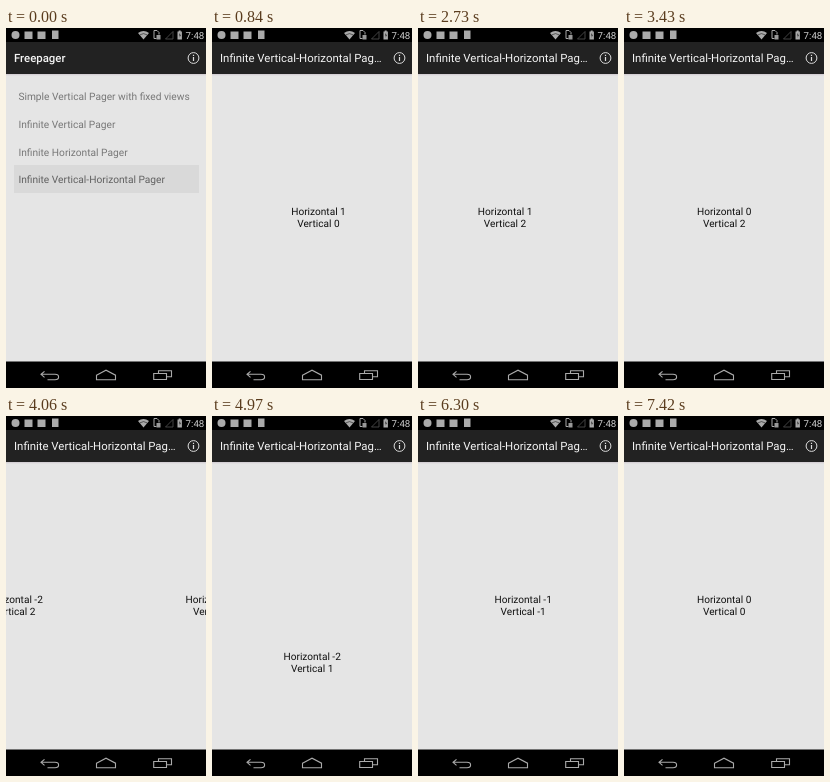
An HTML page that plays this animation: 200x360 px, repeating every 7.49 s.

```html
<!DOCTYPE html>
<html lang="en">
<head>
<meta charset="utf-8">
<title>Infinite pager</title>
<style>
html, body { margin: 0; width: 100%; height: 100%; overflow: hidden; background: #000; }
svg { display: block; width: 100%; height: 100%; }
text { font-family: Roboto, "Noto Sans", sans-serif; text-rendering: geometricPrecision; }
.title { font-size: 11.4px; fill: #f4f4f4; }
.row { font-size: 10.2px; fill: #777; }
.page { font-size: 10.1px; fill: #111; text-anchor: middle; }
.line { fill: none; stroke: #aaa; }
</style>
</head>
<body>
<svg viewBox="0 0 200 360">
  <defs>
    <clipPath id="content"><rect y="45" width="200" height="289"/></clipPath>
    <linearGradient id="shade" x2="0" y2="1">
      <stop stop-color="#cfc8cf"/><stop offset="1" stop-color="#e5e5e5"/>
    </linearGradient>
  </defs>
  <rect width="200" height="360"/>
  <rect y="45" width="200" height="288.5" fill="#e5e5e5"/>
  <rect y="46" width="200" height="2" fill="url(#shade)"/>

  <g clip-path="url(#content)">
    <g id="list">
      <rect x="8" y="137" width="185" height="28" fill="#d9d9d9"/>
    </g>
    <g id="pages"></g>
  </g>

  <rect y="14" width="200" height="32" fill="#222"/>
  <text id="listTitle" class="title" x="8" y="34" font-weight="500">Freepager</text>
  <text id="pageTitle" class="title" x="8" y="34">Infinite Vertical-Horizontal Pag…</text>
  <circle class="line" cx="187.5" cy="30" r="5.4" style="stroke:#ddd"/>
  <path d="M187.5 26.7v1.3M187.5 29v4" stroke="#ddd" stroke-width="1.2"/>

  <!-- status bar -->
  <g fill="#aaa">
    <circle cx="9.5" cy="7" r="4"/>
    <rect x="18.5" y="3.5" width="8" height="7.5"/>
    <rect x="31.5" y="3.5" width="8" height="7.5"/>
    <rect x="46" y="2.5" width="6.5" height="8.5"/>
    <path d="M132 5Q137.5 .8 143 5L137.5 11.5Z"/>
    <path d="M171.5 3.5h1.2v-1h2v1h1.2v8h-4.4z"/>
  </g>
  <path d="M134 6.8q3.5-2.4 7 0" fill="none" stroke="#000" stroke-width=".5"/>
  <path class="line" d="M150.5 10.5h-2.5v-8h3l2 2v2"/>
  <rect x="150.5" y="7" width="4" height="4.5" fill="#999"/>
  <path class="line" d="M159.5 11h7.5v-7.5z" style="stroke:#555" stroke-width=".8"/>
  <path d="M174.2 4.5l-1.4 3h1.2l-.6 2.5 1.6-3.3h-1.2z" fill="#222"/>
  <text x="198.3" y="10.7" font-size="9.7" fill="#ccc" text-anchor="end">7:48</text>

  <!-- navigation bar -->
  <g class="line" stroke-width="1.1">
    <path d="M38.5 343.3l-3.5 3 3.5 3M35.5 346.3h13.5q3.6 0 3.6 2.7t-3.6 2.7h-7.5"/>
    <path d="M90.5 347.2l9.5-5 9.5 5v4.5h-19z"/>
    <path d="M147.7 345.5h12.8v6h-12.800zM152.5 345.500v-2.700h13v6h-5"/>
  </g>
</svg>
<script>
const FRAME = 70, FRAMES = 107;
const SIZE = { x: 200, y: 288 };
const SETTLE = 0.48;
const FADE = [0, 0.35, 0.75];
const FLICK = [15, 63, 143];

// start frame, axis, page step, finger travel per frame; the page then settles by itself
const SWIPES = [
  [7, "x", 1, FLICK],
  [13, "x", 1, FLICK],
  [20, "y", 1, [12, 48, 122, 209]],
  [27, "y", 1, [20, 74, 170]],
  [33, "x", -1, [6, 6, 20, 63, 143]],
  [43, "x", -1, FLICK],
  [50, "x", -1, FLICK],
  [56, "x", -1, [12, 50, 108]],
  [63, "y", -1, [20, 81, 175]],
  [70, "y", -1, [15, 57, 143]],
  [77, "y", -1, [30, 93, 191]],
  [85, "x", 1, [20, 64, 130, 165, 184, 195]],
  [94, "x", 1, [15, 63, 110]],
  [101, "y", 1, [12, 60, 145, 218, 260, 288]],
];

const byId = id => document.getElementById(id);

function addText(parent, cls, x, y, content = "") {
  const el = document.createElementNS("http://www.w3.org/2000/svg", "text");
  el.setAttribute("class", cls);
  el.setAttribute("x", x);
  el.setAttribute("y", y);
  el.textContent = content;
  parent.appendChild(el);
  return el;
}

function addPage() {
  const group = document.createElementNS("http://www.w3.org/2000/svg", "g");
  byId("pages").appendChild(group);
  return {
    group,
    top: addText(group, "page", 100.2, 187),
    bottom: addText(group, "page", 100.2, 199.2),
  };
}

["Simple Vertical Pager with fixed views", "Infinite Vertical Pager",
 "Infinite Horizontal Pager", "Infinite Vertical-Horizontal Pager"]
  .forEach((label, i) => {
    const row = addText(byId("list"), "row", 12.4, 72.4 + 27.6 * i, label);
    if (i === 3) row.style.fill = "#606060";
  });

const current = addPage(), incoming = addPage();

function travel(drag, step, size) {
  if (step < drag.length) return drag[step];
  const k = step - drag.length + 1;
  const rest = (size - drag[drag.length - 1]) * SETTLE ** k;
  return k > 3 || rest < 2 ? size : size - rest;
}

function place(page, cell, axis, offset) {
  page.top.textContent = "Horizontal " + cell.x;
  page.bottom.textContent = "Vertical " + cell.y;
  const [dx, dy] = axis === "x" ? [offset, 0] : [0, offset];
  page.group.setAttribute("transform", `translate(${dx} ${dy})`);
}

function render(time) {
  const frame = Math.floor(time / FRAME) % FRAMES;
  const shown = FADE[frame] ?? 1;
  for (const id of ["list", "listTitle"]) byId(id).setAttribute("opacity", 1 - shown);
  for (const id of ["pages", "pageTitle"]) byId(id).setAttribute("opacity", shown);

  const cell = { x: 0, y: 0 };
  const started = SWIPES.filter(([start]) => start <= frame);
  const active = started.pop();
  for (const [, axis, dir] of started) cell[axis] += dir;

  const [start, axis, dir, drag] = active || [0, "x", 1, [0]];
  const size = SIZE[axis];
  const moved = active ? travel(drag, frame - start, size) : 0;
  place(current, cell, axis, -dir * moved);
  place(incoming, { ...cell, [axis]: cell[axis] + dir }, axis, dir * (size - moved));
}

const origin = performance.now();
function tick() {
  render(performance.now() - origin);
  requestAnimationFrame(tick);
}
tick();
</script>
</body>
</html>
```
